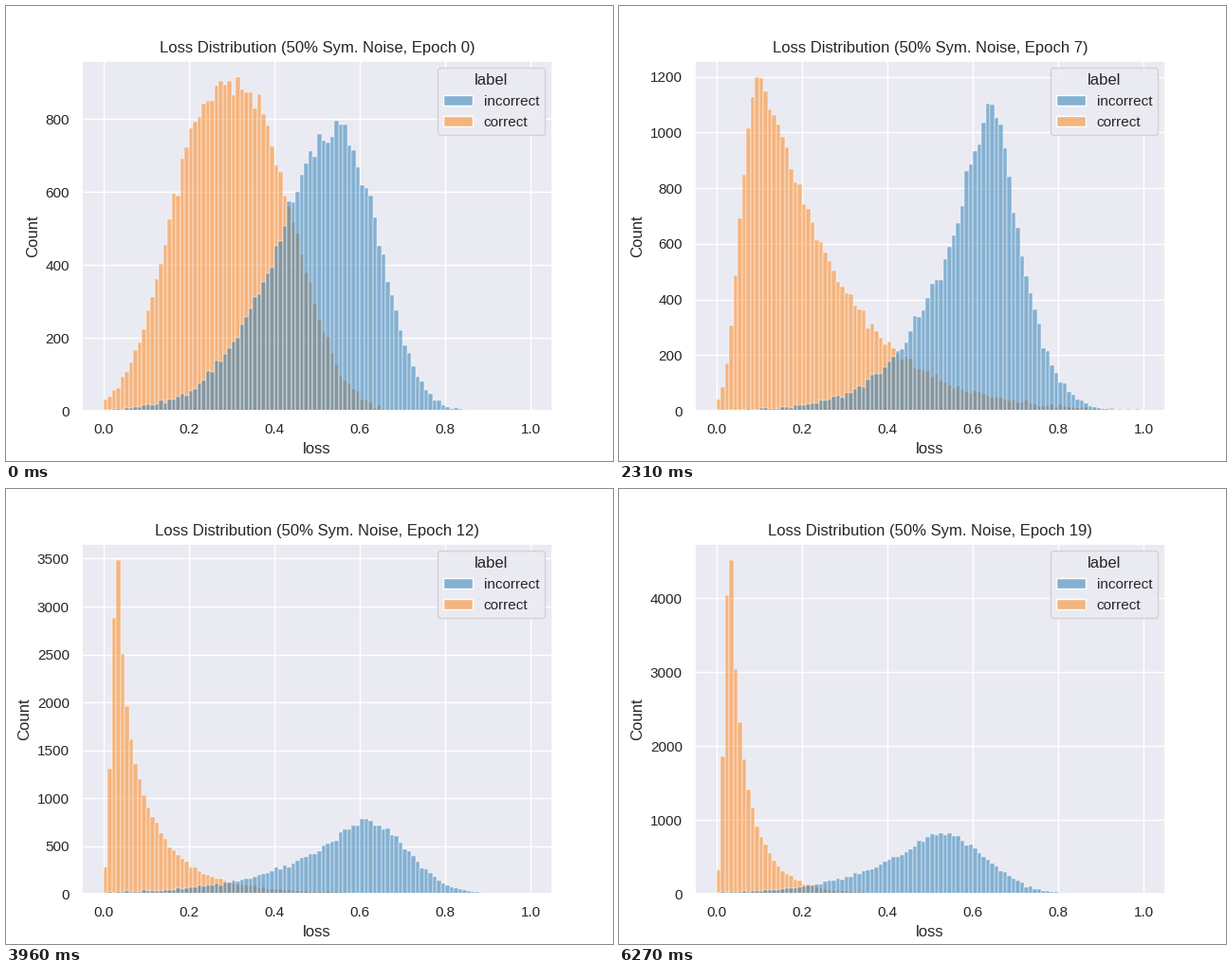
Write a matplotlib script that moves like this. It is 640x480 px and loops after 6.6 s.

```python
import numpy as np
import matplotlib.pyplot as plt
from matplotlib.animation import FuncAnimation
from matplotlib.colors import to_rgba
from matplotlib.patches import Patch

INK = "0.15"
plt.rcParams.update({
    "font.family": "Liberation Sans",
    "text.color": INK,
    "axes.facecolor": "#EAEAF2", "axes.edgecolor": "white",
    "axes.linewidth": 1.25, "axes.labelcolor": INK, "axes.labelsize": 12,
    "axes.titlesize": 12, "axes.grid": True, "axes.axisbelow": True,
    "grid.color": "white", "grid.linewidth": 1,
    "xtick.color": INK, "ytick.color": INK,
    "xtick.labelsize": 11, "ytick.labelsize": 11,
    "xtick.major.size": 6, "ytick.major.size": 6,
    "xtick.bottom": False, "ytick.left": False,
    "legend.fontsize": 11, "legend.title_fontsize": 12,
    "patch.linewidth": 1,
})

EPOCHS, STEP_MS = 20, 330
BINS = np.arange(100)
BLUE = to_rgba("#1f77b4", 0.5)
ORANGE = to_rgba("#ff7f0e", 0.5)

# Tallest bar by epoch
TOP_WRONG = {0: 795, 2: 1053, 3: 940, 5: 945, 8: 1185, 9: 1185, 12: 785,
             14: 752, 19: 825}
TOP_RIGHT = {0: 915, 2: 775, 5: 1035, 8: 1280, 9: 1280, 12: 3483, 14: 3818,
             19: 4510}

# Shape by epoch, in bins: mode, then the distances at which the curve has
# dropped to 50 % and 10 %, first to the left and then to the right
SHAPE_WRONG = {
    0: (54, 16, 32, 11.5, 20),
    2: (57.5, 10.9, 27.5, 7.2, 15.3),
    5: (63, 11.3, 30, 9.2, 19.5),
    9: (64, 9.5, 26, 6.2, 13.5),
    12: (60.5, 13.5, 38, 11.3, 20.5),
    14: (60.5, 16, 40, 11.8, 22),
    19: (52, 13.5, 35, 12, 21.8),
}
SHAPE_RIGHT = {
    0: (28, 14.2, 23.7, 17.4, 28),
    2: (22, 15.8, 20.8, 22, 35.5),
    5: (8.5, 4.7, 7.5, 17, 46),
    9: (11.5, 6.3, 9.7, 12, 36),
    12: (3, 1.73, 2.86, 2.65, 15.3),
    14: (3, 1.78, 2.87, 2.37, 12.6),
    19: (3, 1.84, 2.85, 2.03, 10),
}


def between(keys, t):
    cols = np.array(list(keys.values())).reshape(len(keys), -1).T
    return [np.interp(t, list(keys), col) for col in cols]


def fall(d, d50, d10):
    """Stretched exponential through 0.5 at d50 and 0.1 at d10."""
    power = np.log(np.log(10) / np.log(2)) / np.log(d10 / d50)
    return 0.5 ** ((d / d50) ** power)


def counts(tops, shapes, t, rng):
    top, = between(tops, t)
    mode, l50, l10, r50, r10 = between(shapes, t)
    d = np.abs(BINS - mode)
    n = top * np.where(BINS < mode, fall(d, l50, l10), fall(d, r50, r10))
    n = np.clip(n + rng.normal(0, 0.7, n.size) * np.sqrt(n), 0, None)
    return np.round(n * top / n.max())


def histograms(epoch):
    rng = np.random.default_rng(100 + epoch)
    # Most of the change from epoch 9 to 12 comes in its first step
    t = 12 - 0.3 * (12 - epoch) if 9 < epoch < 12 else epoch
    return (counts(TOP_WRONG, SHAPE_WRONG, t, rng),
            counts(TOP_RIGHT, SHAPE_RIGHT, t, rng))


fig, ax = plt.subplots(figsize=(6.4, 4.8), dpi=100)


def draw(epoch):
    ax.cla()
    bad, good = histograms(epoch)
    for n, color in ((good, ORANGE), (bad, BLUE)):
        ax.bar(BINS / 100, n, width=0.01, align="edge",
               facecolor=color, edgecolor="white", linewidth=0.325)
    ax.set_xlim(-0.05, 1.05)
    ax.set_ylim(0, 1.05 * max(bad.max(), good.max()))
    ax.set_xlabel("loss")
    ax.set_ylabel("Count")
    ax.set_title(f"Loss Distribution (50% Sym. Noise, Epoch {epoch})")
    handles = [Patch(facecolor=BLUE, edgecolor="white", label="incorrect"),
               Patch(facecolor=ORANGE, edgecolor="white", label="correct")]
    ax.legend(handles=handles, title="label", loc="upper right")
    return []


anim = FuncAnimation(fig, draw, frames=EPOCHS, init_func=lambda: draw(0),
                     interval=STEP_MS, repeat=True, repeat_delay=0)
plt.show()
```
